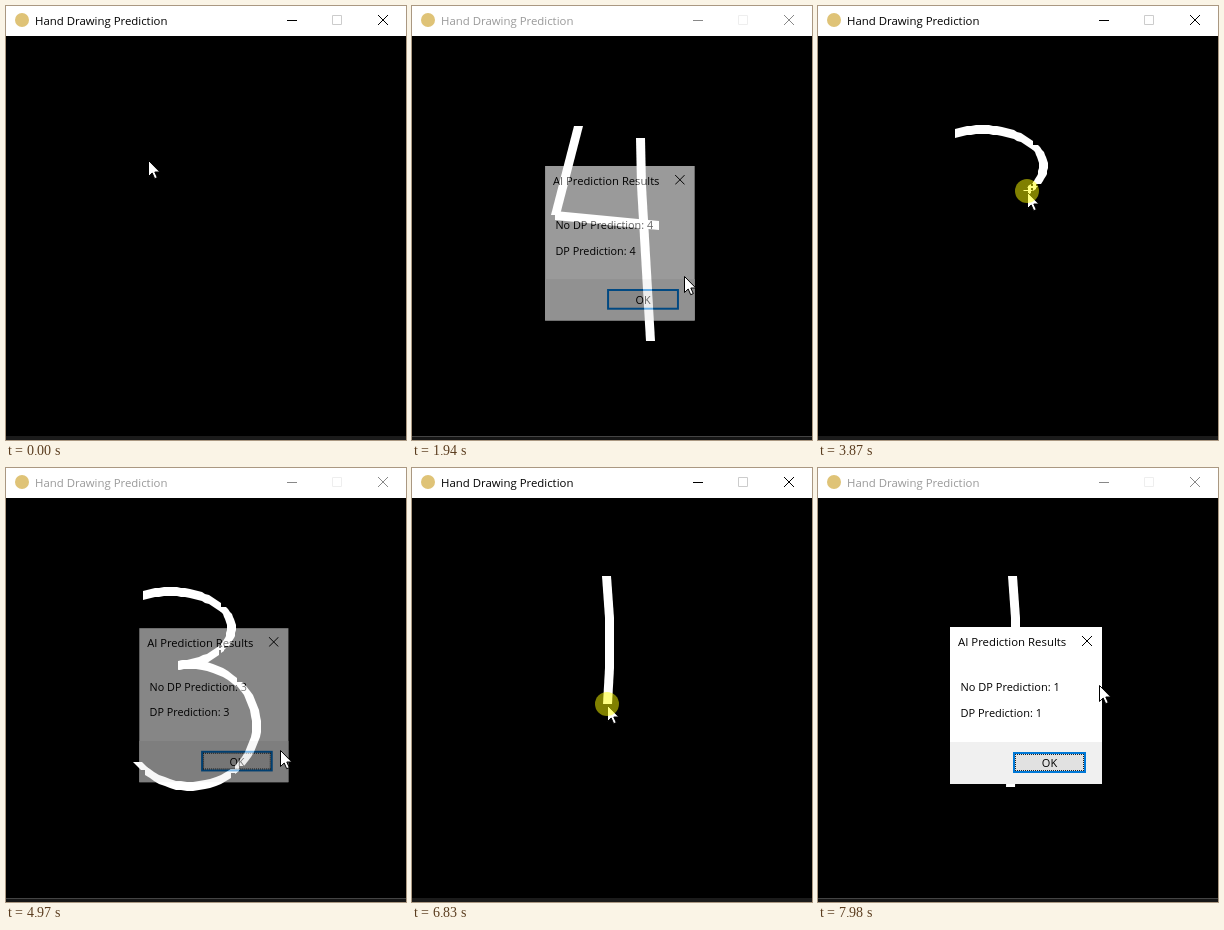
An HTML page with a canvas that plays this animation: 400 px wide and 434 px high, repeating every 8 s.

```html
<!DOCTYPE html>
<html lang="en">
<head>
<meta charset="utf-8">
<title>Hand Drawing Prediction</title>
<style>
html, body { margin: 0; width: 100%; height: 100%; overflow: hidden; background: #000; }
body { font: 11px/20px "Open Sans", "Noto Sans", sans-serif; color: #000; }
#stage { position: relative; width: 400px; height: 434px; overflow: hidden; background: #000; }
#stage * { position: absolute; box-sizing: border-box; white-space: nowrap; }
#bar { left: 0; top: 0; width: 400px; height: 30px; background: #fff; }
#bar svg { left: 0; top: 0; }
#bar span { left: 29px; top: 4.5px; font-size: 11.4px; }
#edge { left: 0; top: 430px; width: 400px; height: 4px; background: #1b1b1b; }
.idle #bar span { color: #999; }
.idle #bar .ctl { stroke: #888; }
.idle #bar .max { stroke: #eee; }
.idle #edge { background: #161616; border-top: 1px solid #444; }
canvas { left: 0; top: 0; }
#dlg { left: 132px; top: 159px; width: 152px; height: 157px; background: #fff; transform-origin: 45% 40%; }
#head { left: 8px; top: 4.6px; font-size: 11.4px; }
#no { left: 10.5px; top: 49.7px; }
#dp { left: 10.5px; top: 75.7px; }
#foot { left: 0; top: 115px; width: 152px; height: 42px; background: #f0f0f0; }
#ok { left: 63px; top: 125px; width: 73px; height: 21px; background: #e1e1e1; border: 2px solid #0078d7; }
#ok i { inset: 0; }
#ok.dots i { border: 1px dotted #222; }
#ok.hot { background: #d4e9fa; border-width: 1px; }
#ok.hot i { inset: 1px; }
#ok span { left: 0; right: 0; top: 50%; margin-top: -10px; text-align: center; }
#dlg svg { left: 132px; top: 9px; }
#cursor { left: 0; top: 1px; overflow: visible; }
#ring { left: 0; top: 0; width: 24px; height: 24px; margin: -12px 0 0 -12px; border-radius: 50%; background: rgba(255, 255, 0, .5); }
</style>
</head>
<body>
<div id="stage">
  <canvas id="pad" width="400" height="430"></canvas>
  <div id="edge"></div>
  <div id="bar">
    <svg width="400" height="30" fill="none">
      <circle cx="16" cy="14" r="7" fill="#dfc377"/>
      <path class="ctl" d="M281 14.5h10" stroke="#000"/>
      <path class="max" d="M326.5 9.5h9v9h-9z" stroke="#ccc"/>
      <path class="ctl" d="M372 9l10 10m0-10l-10 10" stroke="#000"/>
    </svg>
    <span>Hand Drawing Prediction</span>
  </div>
  <div id="dlg">
    <span id="head">AI Prediction Results</span>
    <svg width="10" height="10"><path id="shut" d="M0 0l10 10m0-10L0 10" stroke="#000"/></svg>
    <span id="no"></span>
    <span id="dp"></span>
    <div id="foot"></div>
    <div id="ok"><i></i><span>OK</span></div>
  </div>
  <svg id="cursor" width="14" height="21"><path d="M.5 .5V16.5L4.2 13L6.7 18.7L9.3 17.6L6.8 12H11.8Z" fill="#fff" stroke="#000"/></svg>
  <div id="ring"></div>
</div>
<script>
const LOOP = 8000;
const $ = id => document.getElementById(id);
const ctx = $('pad').getContext('2d');
const clamp = v => Math.max(0, Math.min(1, v));
const ease = u => u * u * (3 - 2 * u);

// The pointer's day: parts follow one another, each from t0 to t1
const parts = [];
let end = { x: 142, y: 153 };

function add(t0, t1, pen, n, at) {
  parts.push({ t0, t1, pen, n, at });
  end = at(1);
}

function straight(t0, t1, x, y, pen) {
  const from = end;
  add(t0, t1, pen, 1, u => {
    const v = pen ? u : ease(u);
    return { x: from.x + (x - from.x) * v, y: from.y + (y - from.y) * v };
  });
}

const go = (t0, t1, x, y) => straight(t0, t1, x, y, false);
const draw = (t0, t1, x, y) => straight(t0, t1, x, y, true);

function drawArc(t0, t1, cx, cy, rx, ry, deg0, deg1) {
  add(t0, t1, true, 48, u => {
    const a = (deg0 + (deg1 - deg0) * u) * Math.PI / 180;
    return { x: cx + rx * Math.cos(a), y: cy + ry * Math.sin(a) };
  });
}

// Digit 4
go(0, 170, 166, 120);
draw(190, 490, 143, 209);
draw(490, 840, 247, 219);
go(860, 1190, 228, 132);
draw(1215, 1360, 229, 180);
draw(1360, 1660, 238, 335);
go(1690, 1940, 272, 269);
go(2420, 2720, 242, 293);

// Digit 3
go(2970, 3330, 137, 128);
drawArc(3360, 4000, 165, 160, 60, 37, -118, 83);
drawArc(4000, 4490, 184, 257, 66, 61, -100, 143);
go(4510, 4690, 274, 281);
go(5380, 5720, 249, 291);

// Digit 1
go(6020, 6300, 194, 108);
draw(6430, 6570, 197, 150);
draw(6570, 6770, 197, 200);
draw(6770, 6970, 192, 319);
go(7040, 7340, 281, 216);

// The button is pressed shortly before each dialog closes
const FADE = 200, PRESS = 150;
const dialogs = [
  { digit: 4, open: 1820, close: 2950 },
  { digit: 3, open: 4866, close: 5960 },
  { digit: 1, open: 7630, close: Infinity }
];

// Thick line whose ends stay parallel to an axis
function brush(a, b) {
  const [ax, ay, bx, by] = [a.x, a.y, b.x, b.y].map(Math.round);
  const dx = Math.abs(bx - ax) > Math.abs(by - ay) ? 0 : 1, dy = 1 - dx;
  ctx.beginPath();
  ctx.moveTo(ax - 4 * dx, ay - 4 * dy);
  ctx.lineTo(bx - 4 * dx, by - 4 * dy);
  ctx.lineTo(bx + 5 * dx, by + 5 * dy);
  ctx.lineTo(ax + 5 * dx, ay + 5 * dy);
  ctx.fill();
}

function showPad(t) {
  const cleared = Math.max(0, ...dialogs.map(d => d.close - 20).filter(c => c <= t));
  let pos, pressed = dialogs.some(d => t > d.close - PRESS && t < d.close - 30);
  ctx.clearRect(0, 0, 400, 430);
  ctx.fillStyle = '#fff';
  for (const p of parts.filter(p => p.t0 <= t)) {
    const u = clamp((t - p.t0) / (p.t1 - p.t0));
    pos = p.at(u);
    if (!p.pen) continue;
    if (t < p.t1 + 20) pressed = true;
    if (p.t0 < cleared) continue;
    for (let k = 0; k < u * p.n; k++) brush(p.at(k / p.n), p.at(Math.min(u, (k + 1) / p.n)));
  }
  const place = `translate(${Math.round(pos.x)}px, ${Math.round(pos.y)}px)`;
  $('cursor').style.transform = $('ring').style.transform = place;
  $('ring').style.display = pressed ? 'block' : 'none';
}

function showDialog(t) {
  const d = dialogs.find(d => t >= d.open && t < d.close + FADE);
  const active = d && t < d.close - 20;
  $('dlg').style.display = d ? 'block' : 'none';
  $('stage').className = active ? 'idle' : '';
  if (!d) return;
  const fade = Math.min(clamp((t - d.open) / FADE), clamp(1 - (t - d.close) / FADE));
  $('dlg').style.opacity = fade;
  $('dlg').style.transform = fade < 1 ? `scale(${.96 + .04 * fade})` : 'none';
  $('no').textContent = 'No DP Prediction: ' + d.digit;
  $('dp').textContent = 'DP Prediction: ' + d.digit;
  $('ok').classList.toggle('hot', t > d.close - 2 * PRESS);
  $('ok').classList.toggle('dots', d.digit < 4);
  $('shut').style.stroke = active ? '#000' : `rgba(0, 0, 0, ${.06 * clamp(1 - (t - d.close) / 40)})`;
}

function frame(now) {
  const t = now % LOOP;
  showPad(t);
  showDialog(t);
  requestAnimationFrame(frame);
}
requestAnimationFrame(frame);
</script>
</body>
</html>
```
